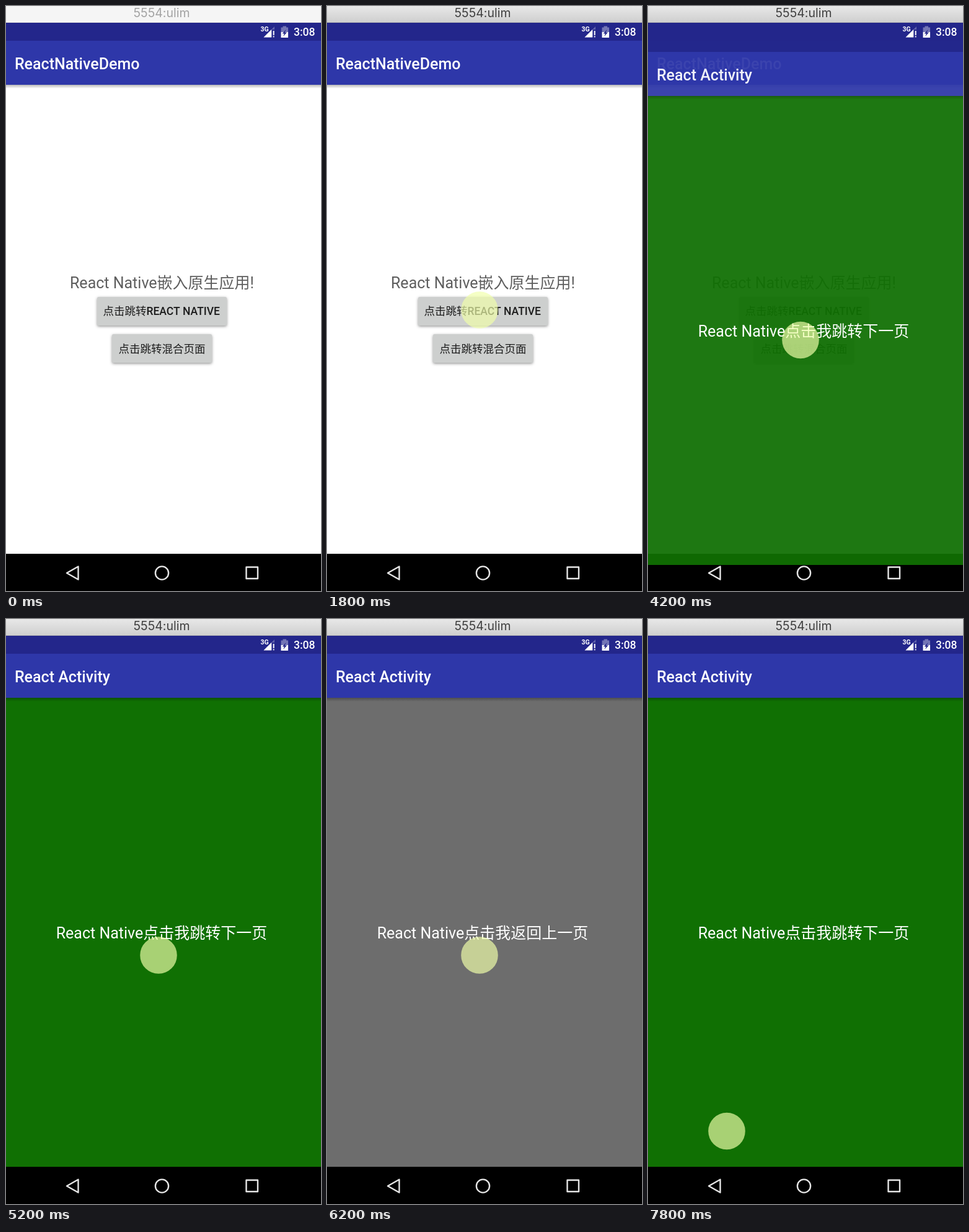
Animation of 508x943 px, one loop 8000 ms. Source, as an HTML page with a canvas:

```html
<!DOCTYPE html>
<html lang="zh-CN">
<head>
<meta charset="utf-8">
<title>ReactNativeDemo</title>
<style>
html, body { margin: 0; width: 100%; height: 100%; overflow: hidden; background: #000; }
canvas { display: block; width: 508px; height: 943px; }
</style>
</head>
<body>
<canvas id="stage" width="508" height="943"></canvas>
<script>
const W = 508, H = 943, LOOP = 8000, STEP = 200;
const TOP = 127, BOTTOM = 883, TRAVEL = 857;
const FONT = 'Roboto, "Noto Sans CJK SC", "Noto Sans CJK", sans-serif';

const screen = document.getElementById('stage').getContext('2d');
const layer = document.createElement('canvas');
layer.width = W;
layer.height = H;
let ctx = screen;

// Cursor stops: time, x, y
const PATH = [
  [400, 402, 588], [600, 385, 577], [1200, 262, 502], [1400, 248, 494],
  [1600, 246, 491], [1800, 246, 490], [3400, 246, 490], [4200, 246, 538.5],
  [4400, 246, 541], [4600, 246, 542], [7200, 246, 542], [7800, 127, 825.5]
];

function rect(x, y, w, h, fill) {
  ctx.fillStyle = fill;
  ctx.fillRect(x, y, w, h);
}

function text(str, x, y, size, fill, weight = 400, align = 'left', family = FONT) {
  ctx.font = `${weight} ${size}px ${family}`;
  ctx.textAlign = align;
  ctx.fillStyle = fill;
  ctx.fillText(str, x, y);
}

function shape(points, fill) {
  ctx.beginPath();
  points.forEach(([x, y]) => ctx.lineTo(x, y));
  ctx.closePath();
  if (fill) {
    ctx.fillStyle = fill;
    ctx.fill();
  } else {
    ctx.stroke();
  }
}

function fade(y0, y1, from, to) {
  const g = ctx.createLinearGradient(0, y0, 0, y1);
  g.addColorStop(0, from);
  g.addColorStop(1, to);
  return g;
}

function button(x, y, w, h) {
  ctx.save();
  ctx.shadowColor = 'rgba(0,0,0,.42)';
  ctx.shadowBlur = 4;
  ctx.shadowOffsetY = 1.5;
  ctx.fillStyle = '#cdcfce';
  ctx.beginPath();
  ctx.roundRect(x, y, w, h, 2.5);
  ctx.fill();
  ctx.restore();
}

function windowBar(active) {
  rect(0, 0, W, 27, active ? fade(0, 26, '#e8e8e8', '#cfcfcf') : '#f5f5f5');
  rect(0, 26, W, 1, active ? '#b4b4b4' : '#dedede');
  text('5554:ulim', 251, 18.3, 19.5, active ? '#404040' : '#a3a3a3', 400, 'center', 'Inter, sans-serif');
}

function appBar(title) {
  rect(0, TOP, W, 6, fade(TOP, TOP + 6, 'rgba(0,0,0,.28)', 'rgba(0,0,0,0)'));
  rect(0, 27, W, 29, '#23268b');
  rect(0, 56, W, TOP - 56, '#2e37a9');
  text(title, 14, 101.5, 25, '#fff', 500);
}

function homePage() {
  rect(0, TOP, W, BOTTOM - TOP, '#fff');
  text('React Native嵌入原生应用!', 251.5, 454.5, 25, '#5e5e5e', 400, 'center');
  button(147, 469, 209, 46);
  text('点击跳转', 156.5, 498, 17.5, '#1c1c1c');
  text('REACT NATIVE', 226.5, 498, 17.5, '#1c1c1c', 500);
  button(171, 529, 161, 46);
  text('点击跳转混合页面', 251.5, 558.5, 17.5, '#1c1c1c', 400, 'center');
  appBar('ReactNativeDemo');
}

function card(y, color, label) {
  rect(0, TOP + y, W, BOTTOM - TOP, color);
  text(label, 251, 515 + y, 25, '#fff', 400, 'center');
}

function reactPage(progress) {
  const shift = Math.round(TRAVEL * progress);
  ctx.save();
  ctx.beginPath();
  ctx.rect(0, TOP, W, BOTTOM - TOP);
  ctx.clip();
  rect(0, TOP, W, BOTTOM - TOP, '#fff');
  card(-shift, '#107003', 'React Native点击我跳转下一页');
  card(TRAVEL - shift, '#6d6d6d', 'React Native点击我返回上一页');
  ctx.restore();
  appBar('React Activity');
}

// The opening page fades in as one flat layer
function openPage(ms, progress) {
  ctx = layer.getContext('2d');
  ctx.clearRect(0, 0, W, H);
  reactPage(progress);
  ctx = screen;
  ctx.save();
  ctx.globalAlpha = 1 - Math.max(0, 1 - ms / 200) ** 5;
  ctx.drawImage(layer, 0, Math.round(72 * Math.max(0, 1 - ms / 350) ** 5));
  ctx.restore();
}

function navIcons() {
  ctx.strokeStyle = '#e6e6e6';
  ctx.lineWidth = 2.4;
  ctx.lineJoin = 'round';
  shape([[98, 914], [116.5, 903.5], [116.5, 924.5]]);
  ctx.beginPath();
  ctx.arc(251.5, 914, 10.6, 0, Math.PI * 2);
  ctx.stroke();
  ctx.strokeRect(387.5, 904.5, 18.5, 18.5);
}

function statusIcons() {
  text('3G', 410.5, 41, 10.5, '#fff', 700);
  shape([[415.5, 50.5], [433, 50.5], [433, 33]], 'rgba(255,255,255,.28)');
  shape([[415.5, 50.5], [428, 50.5], [428, 38]], '#fff');
  rect(429, 38, 5, 13, '#23268b');
  rect(430.7, 40, 1.9, 7, '#fff');
  rect(430.7, 48.4, 1.9, 2, '#fff');
  rect(446.5, 32.5, 5.5, 2.5, '#7375b5');
  rect(443.5, 34.5, 11.5, 7.5, '#7375b5');
  rect(443.5, 42, 11.5, 9, '#fff');
  shape([[451.5, 38], [445.6, 44.5], [448.8, 44.5], [447.2, 49], [453, 42.5], [449.8, 42.5]], '#23268b');
  text('3:08', 464, 48.3, 17.5, '#fff', 500);
}

function cursor(t) {
  if (t < PATH[0][0]) return;
  const i = PATH.findIndex(p => p[0] > t);
  let [, x, y] = PATH[i < 0 ? PATH.length - 1 : i - 1];
  if (i > 0) {
    const [t0] = PATH[i - 1], [t1, x1, y1] = PATH[i];
    const k = (t - t0) / (t1 - t0), e = k * k * (3 - 2 * k);
    x += (x1 - x) * e;
    y += (y1 - y) * e;
  }
  ctx.beginPath();
  ctx.arc(x, y, 29.8, 0, Math.PI * 2);
  ctx.fillStyle = 'rgba(240,255,170,.68)';
  ctx.fill();
}

// Damped spring from 0 to 1: tension 200, friction 26, start velocity 1.5
function spring(ms) {
  if (ms <= 0) return 0;
  const s = ms / 1000, w = Math.sqrt(200 - 169);
  const rest = Math.exp(-13 * s) * (Math.cos(w * s) + 11.5 / w * Math.sin(w * s));
  return Math.min(1, 1 - rest);
}

function draw(t) {
  const open = t - 4115;
  windowBar(t >= 1600);
  homePage();
  rect(0, BOTTOM, W, H - BOTTOM, '#000');
  if (open > 0) openPage(open, spring(t - 5480.8) - spring(t - 6774.4));
  navIcons();
  statusIcons();
  cursor(t);
}

const start = performance.now();

function tick() {
  const t = (performance.now() - start) % LOOP;
  draw(Math.floor(t / STEP) * STEP);
  requestAnimationFrame(tick);
}

tick();
</script>
</body>
</html>
```
